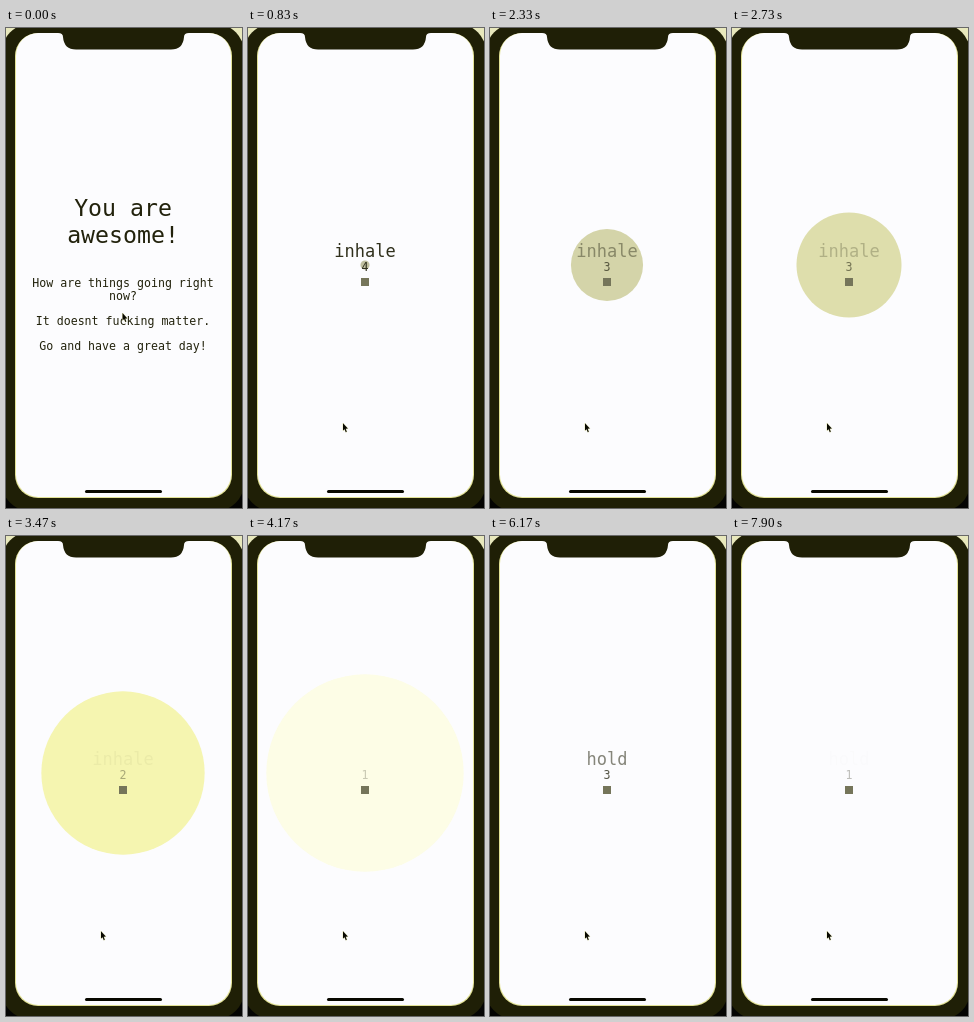
Write an HTML page with a canvas that moves like this. It is 236 by 480 pixels and loops after 8000 ms.

```html
<!DOCTYPE html>
<html lang="en">
<head>
<meta charset="utf-8">
<title>Breathing exercise</title>
<style>
  html, body { margin: 0; width: 100%; height: 100%; overflow: hidden; background: #fcfcfe; }
  canvas { display: block; width: 236px; height: 480px; }
</style>
</head>
<body>
<canvas id="stage"></canvas>
<script>
const W = 236, H = 480, LOOP = 8000, CX = 117;
const INHALE = 760, HOLD = 4830, PHASE = 4000;
const PAPER = '#fcfcfe', CASE = '#1f1f06', INK = '#22220c', RIM = '#e2e296';
const FONT = '"DejaVu Sans Mono", monospace';

const canvas = document.getElementById('stage');
const ctx = canvas.getContext('2d');
const dpr = window.devicePixelRatio || 1;
canvas.width = W * dpr;
canvas.height = H * dpr;

const clamp = x => Math.min(1, Math.max(0, x));
const lerp = (a, b, k) => a + (b - a) * k;

// cubic-bezier(.42, 0, .58, 1)
function easeInOut(x) {
  if (x <= 0 || x >= 1) return clamp(x);
  let lo = 0, hi = 1, s = 0.5;
  for (let i = 0; i < 24; i++) {
    s = (lo + hi) / 2;
    const bx = 3 * s * (1 - s) * (1 - s) * 0.42 + 3 * s * s * (1 - s) * 0.58 + s * s * s;
    if (bx < x) lo = s; else hi = s;
  }
  return s * s * (3 - 2 * s);
}

function text(str, y, size, color = INK, alpha = 1) {
  ctx.globalAlpha = alpha;
  ctx.fillStyle = color;
  ctx.font = `${size}px ${FONT}`;
  ctx.textAlign = 'center';
  ctx.fillText(str, CX, y);
  ctx.globalAlpha = 1;
}

function box(x, y, w, h, r, color) {
  ctx.fillStyle = color;
  ctx.beginPath();
  ctx.roundRect(x, y, w, h, r);
  ctx.fill();
}

function phone() {
  // light backdrop above, dark below the case
  box(0, 0, W, H / 2, 0, '#e8e8bc');
  box(0, H / 2, W, H / 2, 0, '#040402');
  box(-4, -4, 242, 487, 28, CASE);
  box(9, 5, 217, 465, 23, RIM);
  box(10, 5, 215, 464, 22.5, PAPER);

  // notch with flared upper corners
  ctx.fillStyle = CASE;
  ctx.beginPath();
  ctx.moveTo(52, 4);
  ctx.lineTo(52, 5);
  ctx.quadraticCurveTo(57, 5, 57, 9);
  ctx.quadraticCurveTo(58, 21.5, 70, 21.5);
  ctx.lineTo(165, 21.5);
  ctx.quadraticCurveTo(177, 21.5, 178, 9);
  ctx.quadraticCurveTo(178, 5, 183, 5);
  ctx.lineTo(183, 4);
  ctx.fill();

  box(79, 462, 77, 3, 1.5, '#080800');
}

function greeting() {
  text('You are', 188, 23.2);
  text('awesome!', 215, 23.2);
  text('How are things going right', 259, 11.6);
  text('now?', 272, 11.6);
  text('It doesnt fucking matter.', 297, 11.6);
  text('Go and have a great day!', 322, 11.6);
}

// circle colour by eased progress: [progress, red/green, blue]
const TINTS = [[0, 192, 160], [0.14, 201, 165], [0.49, 222, 172],
               [0.785, 245, 176], [0.956, 253, 230], [1, 252, 254]];

function tint(p) {
  const i = Math.max(1, TINTS.findIndex(s => s[0] >= p));
  const a = TINTS[i - 1], b = TINTS[i];
  const k = (p - a[0]) / (b[0] - a[0]);
  const rg = lerp(a[1], b[1], k);
  return `rgb(${rg}, ${rg}, ${lerp(a[2], b[2], k)})`;
}

function breath(word, elapsed, grows) {
  const p = easeInOut(elapsed / PHASE);
  if (grows) {
    ctx.fillStyle = tint(p);
    ctx.beginPath();
    ctx.arc(CX, 237, lerp(4.5, 103, p), 0, Math.PI * 2);
    ctx.fill();
  }
  const count = Math.max(1, 4 - Math.floor(elapsed / 1000));
  text(word, 229, 17, '#30301c', (1 - p) * (1 - p));
  text(count, 243, 11.6, '#2e2e1c', 1 - 0.78 * p);
  box(113, 250, 8, 8, 0, '#75755a');
}

function cursor(t) {
  const k = easeInOut((t - 30) / 670);
  ctx.save();
  ctx.translate(lerp(116.5, 95, k), lerp(285, 395.2, k));
  ctx.beginPath();
  [[0, 0], [0, 7.4], [1.6, 6], [2.8, 9], [3.8, 8.6], [2.7, 5.6], [4.9, 5.4]]
    .forEach(([x, y]) => ctx.lineTo(x, y));
  ctx.closePath();
  ctx.strokeStyle = '#ececc0';
  ctx.lineWidth = 1;
  ctx.stroke();
  ctx.fillStyle = '#080800';
  ctx.fill();
  ctx.restore();
}

function draw(t) {
  ctx.setTransform(dpr, 0, 0, dpr, 0, 0);
  phone();
  if (t < INHALE) greeting();
  else if (t < HOLD) breath('inhale', t - INHALE, true);
  else breath('hold', t - HOLD, false);
  cursor(t);
}

const start = performance.now();
function tick() {
  draw((performance.now() - start) % LOOP);
  requestAnimationFrame(tick);
}
tick();
</script>
</body>
</html>
```
